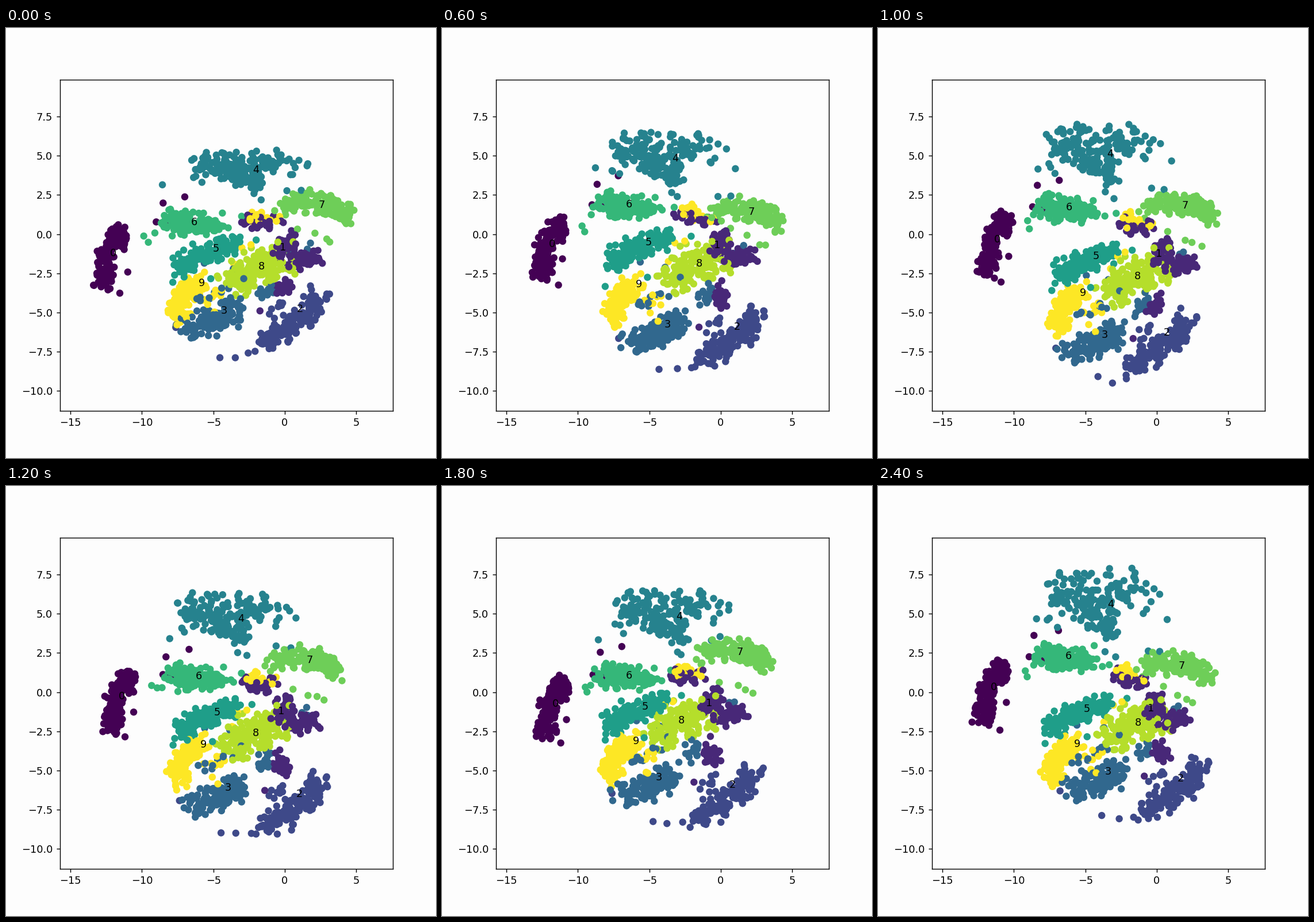
Write a matplotlib script that moves like this. It is 748 by 748 pixels and loops after 2600 ms.

```python
import numpy as np
import matplotlib.pyplot as plt
from matplotlib.animation import FuncAnimation

SIZE, DPI = 748, 128
FRAMES, INTERVAL = 13, 200
KEYS = [0, 1, 3, 5, 7, 10, 12]  # steps at which the label waypoints hold
ORIGIN = np.array([485, 358.5])
SCALE = np.array([24.85, -27.25])
REACH = 50    # how far a label drags foreign points along, in pixels
LOYALTY = 3   # pull of a point's own label inside its main cloud
JITTER = 2.5  # points settle slightly differently at each step

rng = np.random.default_rng(11)

# Label waypoints in pixels, one path per digit.
PATHS = [
    [(187, 392), (203, 385), (192, 376), (208, 368), (196, 364), (199, 386), (202, 350)],
    [(482, 382), (469, 386), (479, 378), (489, 393), (469, 391), (462, 372), (475, 387)],
    [(511, 489), (501, 527), (513, 520), (502, 530), (519, 541), (499, 510), (526, 509)],
    [(379, 492), (395, 517), (392, 516), (394, 534), (379, 516), (376, 502), (400, 497)],
    [(435, 247), (416, 228), (406, 227), (404, 219), (414, 242), (412, 219), (405, 206)],
    [(365, 384), (376, 391), (359, 373), (379, 397), (355, 391), (353, 380), (363, 388)],
    [(327, 338), (307, 314), (325, 307), (332, 312), (339, 350), (318, 320), (331, 296)],
    [(549, 308), (543, 317), (538, 320), (534, 309), (522, 297), (516, 285), (528, 313)],
    [(444, 415), (443, 425), (447, 410), (451, 432), (417, 427), (416, 399), (452, 412)],
    [(341, 444), (354, 452), (343, 446), (357, 461), (331, 438), (341, 447), (347, 449)],
]


def glide(path):
    return np.column_stack([np.interp(range(FRAMES), KEYS, axis) for axis in zip(*path)])


labels = np.stack([glide(path) for path in PATHS], axis=1)  # (step, digit, xy)
home = np.mean(PATHS, axis=1)
shifts = labels - home
points, digits = [], []


def to_data(pixels):
    return (pixels - ORIGIN) / SCALE


def add(digit, spots, loyalty=0, floor=None):
    """Let spots drift with the labels near them; a floor pins their lower edge."""
    spots = np.asarray(spots, float)
    distance = np.linalg.norm(spots[:, None] - home, axis=2)
    pull = np.exp(-(distance / REACH) ** 2) + 1e-9
    pull[:, digit] += loyalty
    pull /= pull.sum(axis=1, keepdims=True)
    drift = np.einsum("pd,sdk->spk", pull, shifts)
    if floor:
        drift[..., 1] *= (floor - spots[:, 1]) / (floor - home[digit, 1])
    points.append(spots + drift)
    digits.extend([digit] * len(spots))


def scatter(count, spread, *spine):
    """Random spots around a polyline, softly thinning outwards."""
    u = rng.uniform(0, len(spine) - 1, count)
    path = [np.interp(u, range(len(spine)), axis) for axis in zip(*spine)]
    noise = np.clip(rng.normal(size=(count, 2)), -2, 2)
    return np.column_stack(path) + noise * spread


def cloud(digit, count, spread, *spine, floor=None):
    add(digit, scatter(count, spread, *spine), LOYALTY, floor)


def patch(digit, count, spread, *spine):
    add(digit, scatter(count, spread, *spine))


def strays(digit, *spots):
    add(digit, spots)


cloud(0, 165, 8.5, (215, 338), (185, 374), (181, 435))
strays(0, (263, 318), (277, 322), (271, 282), (309, 272), (206, 444), (218, 403))

cloud(1, 90, 9, (476, 373), (485, 395), (528, 407))
patch(1, 30, 7, (477, 458), (482, 483))
patch(1, 32, 7, (413, 336), (455, 341))
strays(1, (446, 517))

cloud(2, 150, 9.5, (451, 580), (487, 552), (527, 523), (544, 494))
patch(2, 8, 10, (472, 517))
strays(2, (304, 536), (378, 587), (405, 592), (430, 588))

cloud(3, 150, 11.5, (326, 543), (361, 533), (389, 515), (415, 510))
patch(3, 14, 8, (441, 478), (460, 452))
patch(3, 10, 8, (343, 480), (390, 480))
patch(3, 4, 10, (500, 390))
strays(3, (347, 416), (390, 422), (412, 442))

cloud(4, 140, 17, (314, 221), (352, 216), (399, 217), (432, 200), (480, 215), floor=295)
cloud(4, 55, 10, (365, 240), (400, 245), (425, 282), floor=295)
strays(4, (272, 254), (477, 283), (498, 282), (511, 233))

cloud(5, 150, 9, (302, 419), (327, 402), (364, 387), (398, 374))
strays(5, (291, 448), (430, 370), (361, 440))

cloud(6, 155, 10, (278, 315), (303, 323), (337, 328), (370, 324))
strays(6, (251, 346), (255, 355), (405, 322))

cloud(7, 165, 9.5, (465, 311), (508, 299), (550, 308), (585, 327))
strays(7, (498, 350), (526, 359), (543, 368), (553, 374))

cloud(8, 170, 15, (388, 438), (413, 435), (445, 409), (470, 417))
strays(8, (490, 373), (468, 376), (490, 430))

cloud(9, 130, 10.5, (339, 451), (319, 459), (303, 480), (302, 508))
patch(9, 11, 11, (359, 475))
patch(9, 22, 6, (418, 326), (430, 328), (469, 327))
strays(9, (417, 378), (405, 383), (393, 410), (371, 508))

points = np.concatenate(points, axis=1)
points += np.clip(rng.normal(0, JITTER, points.shape), -2 * JITTER, 2 * JITTER)
order = rng.permutation(len(digits))
points, digits = to_data(points[:, order]), np.array(digits)[order]

plt.rcParams["font.family"] = "DejaVu Sans"
fig = plt.figure(figsize=(SIZE / DPI, SIZE / DPI), dpi=DPI, facecolor="#fdfdfd")
ax = fig.add_axes([0.125, 0.11, 0.775, 0.77], facecolor="#fdfdfd")
ax.set(xlim=(-15.75, 7.573), ylim=(-11.274, 9.862),
       xticks=np.arange(-15, 6, 5), yticks=np.arange(-10, 8, 2.5))
dots = ax.scatter(*points[0].T, c=digits, cmap="viridis", s=36)
texts = [ax.text(0, 0, str(d), ha="center", va="center") for d in range(10)]


def update(step):
    dots.set_offsets(points[step])
    for text, spot in zip(texts, to_data(labels[step])):
        text.set_position(spot)
    return [dots, *texts]


anim = FuncAnimation(fig, update, frames=FRAMES, interval=INTERVAL,
                     repeat=True, repeat_delay=0)
plt.show()
```
